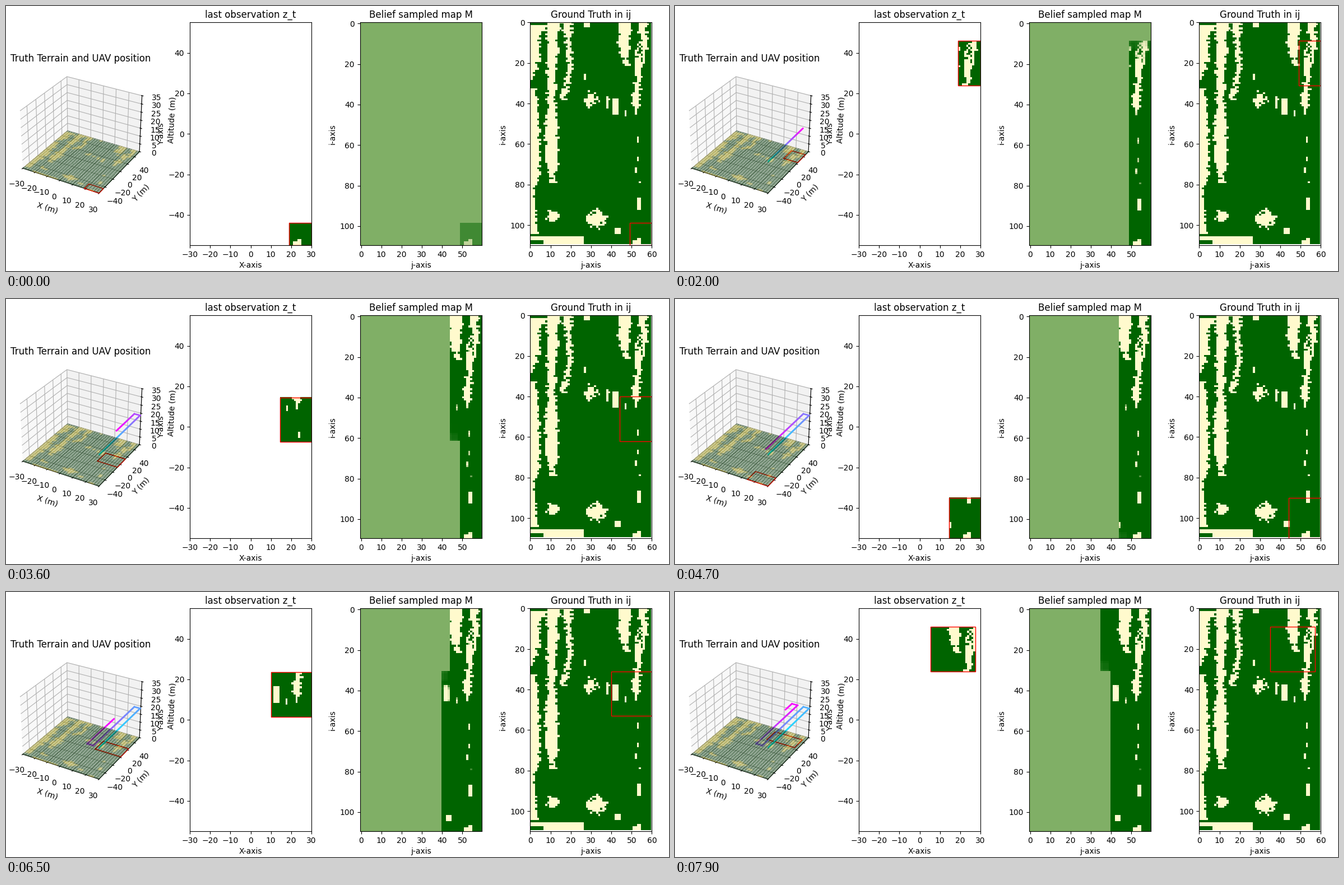
Write a matplotlib script that moves like this. It is 1183 by 473 pixels and loops after 8 s.

```python
import numpy as np
import matplotlib.pyplot as plt
from matplotlib.animation import FuncAnimation
from matplotlib.colors import LinearSegmentedColormap
from matplotlib.patches import Rectangle
from mpl_toolkits.mplot3d.art3d import Line3DCollection

W, H, DPI = 1183, 473, 100
FRAMES, INTERVAL = 80, 100
ROWS, COLS = 110, 60
HALF_X, HALF_Y = 30, 55
STEP, REACH = 4.5, 11
ALTITUDE = REACH * np.sqrt(3)
COUPLING = 1.5

TERRAIN = LinearSegmentedColormap.from_list("terrain2", ["darkgreen", "lemonchiffon"])

# Ragged vertical strips: (row, first column, end column) key points
BANDS = [
    [(2, 0, 9), (7, 0, 5), (18, 0, 5), (28, 0, 2)],
    [(33, 0, 3), (48, 0, 5), (77, 0, 5), (82, 0, 3), (104, 0, 4)],
    [(0, 9, 17), (6, 9, 14), (32, 9, 13), (66, 8, 14), (79, 11, 13)],
    [(0, 17, 21), (22, 19, 21), (38, 16, 18)],
    [(0, 44, 50), (10, 44, 49), (21, 47, 49)],
    [(0, 54, 58), (10, 55, 58), (22, 55, 56)],
    [(10, 53, 54), (26, 52, 55), (42, 51, 54)],
]
# Rough patches: (row, column, row radius, column radius)
BLOBS = [(38, 30, 4, 4), (39, 38, 4, 1.2), (96, 11, 4, 3), (97, 33, 5, 6)]
# Solid patches: (first row, end row, first column, end column)
BLOCKS = [(0, 3, 27, 30), (38, 46, 41, 44), (87, 93, 53, 55), (102, 105, 42, 45),
          (106, 108, 0, 27), (108, 110, 7, 27), (107, 108, 53, 55), (108, 110, 51, 55)]
# One column wide: (row, column, height)
SPECKS = [(26, 27, 3), (44, 47, 3), (43, 52, 3), (57, 53, 3), (67, 53, 2),
          (72, 52, 3), (79, 54, 1)]


def make_truth():
    rng = np.random.default_rng(4)
    grid = np.zeros((ROWS, COLS))
    for band in BANDS:
        keys, left, right = zip(*band)
        for row in range(keys[0], keys[-1] + 1):
            shift = rng.choice([-1, 0, 0, 0, 1], 2)
            a = round(np.interp(row, keys, left))
            b = round(np.interp(row, keys, right))
            a = max(0, a + shift[0]) if a else 0
            grid[row, a:max(a + 1, b + shift[1])] = 1
    rows, cols = np.indices(grid.shape)
    for row, col, tall, wide in BLOBS:
        reach = np.hypot((rows - row) / tall, (cols - col) / wide)
        grid[reach + rng.uniform(-0.1, 0.6, grid.shape) < 1] = 1
    for top, bottom, a, b in BLOCKS:
        grid[top:bottom, a:b] = 1
    for row, col, tall in SPECKS:
        grid[row:row + tall, col] = 1
    return grid


def make_path():
    x, y, heading = HALF_X, -HALF_Y, 1
    path = [(x, y)]
    while len(path) < FRAMES:
        ahead = y + heading * STEP
        if abs(ahead) > HALF_Y:
            x -= STEP
            heading = -heading
        else:
            y = ahead
        path.append((x, y))
    return np.array(path, float)


def footprint(x, y):
    return (max(x - REACH, -HALF_X), min(x + REACH, HALF_X),
            max(y - REACH, -HALF_Y), min(y + REACH, HALF_Y))


def cells(x0, x1, y0, y1):
    return int(HALF_Y - y1), int(HALF_Y - y0), int(x0 + HALF_X), int(x1 + HALF_X)


def neighbour_mean(a):
    p = np.pad(a, 1, mode="edge")
    return sum(p[i:i + ROWS, j:j + COLS] for i in range(3) for j in range(3)) / 9


def make_beliefs():
    votes = np.zeros((ROWS, COLS))
    beliefs = []
    for n, (x, y) in enumerate(path):
        i0, i1, j0, j1 = cells(*footprint(x, y))
        seen = np.zeros_like(votes)
        seen[i0:i1, j0:j1] = 1
        votes += seen * (2 * truth - 1)
        score = votes + (COUPLING * neighbour_mean(votes) if n else 0)
        score[votes == 0] = 0
        beliefs.append(1 / (1 + 3.0 ** -score))
    return beliefs


truth = make_truth()
path = make_path()
beliefs = make_beliefs()

fig = plt.figure(figsize=((W + 1e-6) / DPI, (H + 1e-6) / DPI), dpi=DPI)


def place(left, top, width, height, **kw):
    return fig.add_axes([left / W, 1 - (top + height) / H, width / W, height / H], **kw)


def red_box(ax):
    return ax.add_patch(Rectangle((0, 0), 1, 1, fill=False, ec="red", lw=1))


def flat_panel(left, title, xlabel, ylabel, data, **kw):
    ax = place(left, 29.4, 217, 397.8)
    image = ax.imshow(data, cmap=TERRAIN, vmin=0, vmax=1, aspect="auto",
                      interpolation="nearest", **kw)
    ax.set(title=title, xlabel=xlabel, ylabel=ylabel)
    ax.set_autoscale_on(False)
    return ax, image


# 3D view
ax3 = place(11.7, 107.3, 242, 242, projection="3d", computed_zorder=False)
ax3.set_title("Truth Terrain and UAV position")
gx, gy = np.meshgrid(np.arange(-HALF_X, HALF_X + 1.0),
                     np.arange(HALF_Y, -HALF_Y - 1.0, -1))
ground = np.where(truth[..., None] > 0, (0.56, 0.53, 0, 0.3), (0, 0.2, 0.01, 0.3))
ax3.plot_surface(gx, gy, np.zeros_like(gx), facecolors=ground, shade=False,
                 linewidth=0, antialiased=False, zorder=5)
points = np.column_stack([path, np.full(FRAMES, ALTITUDE)])
segments = np.stack([points[:-1], points[1:]], axis=1)
trail = Line3DCollection(segments[:1], linewidths=2, zorder=3)
trail.set_capstyle("projecting")
ax3.add_collection3d(trail)
ground_box, = ax3.plot([0, 0], [0, 0], [0, 0], color="red", lw=1.2, zorder=2)
ax3.set(xlim=(-HALF_X, HALF_X), ylim=(-HALF_Y, HALF_Y), zlim=(0, 35),
        xlabel="X (m)", ylabel="Y (m)", zlabel="Altitude (m)",
        xticks=range(-30, 31, 10), yticks=range(-40, 41, 20), zticks=range(0, 36, 5))

# Flat views
ax_obs, obs_image = flat_panel(328, "last observation z_t", "X-axis", "Y-axis", truth,
                               extent=(-HALF_X, HALF_X, -HALF_Y, HALF_Y))
ax_obs.set(xticks=range(-30, 31, 10), yticks=range(-40, 41, 20))
ax_belief, belief_image = flat_panel(631.7, "Belief sampled map M", "j-axis", "i-axis",
                                     beliefs[0])
ax_belief.set(xticks=range(0, 51, 10), yticks=range(0, 101, 20))
ax_truth, _ = flat_panel(935.4, "Ground Truth in ij", "j-axis", "i-axis", truth)
ax_truth.set(xlim=(0, COLS), ylim=(ROWS, 0),
             xticks=range(0, 61, 10), yticks=range(0, 101, 20))
obs_box, truth_box = red_box(ax_obs), red_box(ax_truth)


def update(n):
    area = x0, x1, y0, y1 = footprint(*path[n])
    i0, i1, j0, j1 = cells(*area)

    obs_image.set_data(truth[i0:i1, j0:j1])
    obs_image.set_extent(area)
    obs_box.set_bounds(x0, y0, x1 - x0, y1 - y0)
    belief_image.set_data(beliefs[n])
    truth_box.set_bounds(j0, i0, j1 - j0, i1 - i0)

    ground_box.set_data_3d([x0, x1, x1, x0, x0], [y0, y0, y1, y1, y0], [0] * 5)
    trail.set_visible(n > 0)
    if n:
        trail.set_segments(segments[:n])
        trail.set_color(plt.cm.cool(np.linspace(0, 1, n)))
    return []


anim = FuncAnimation(fig, update, frames=FRAMES, interval=INTERVAL,
                     init_func=lambda: update(0), repeat=True, repeat_delay=0)
plt.show()
```
